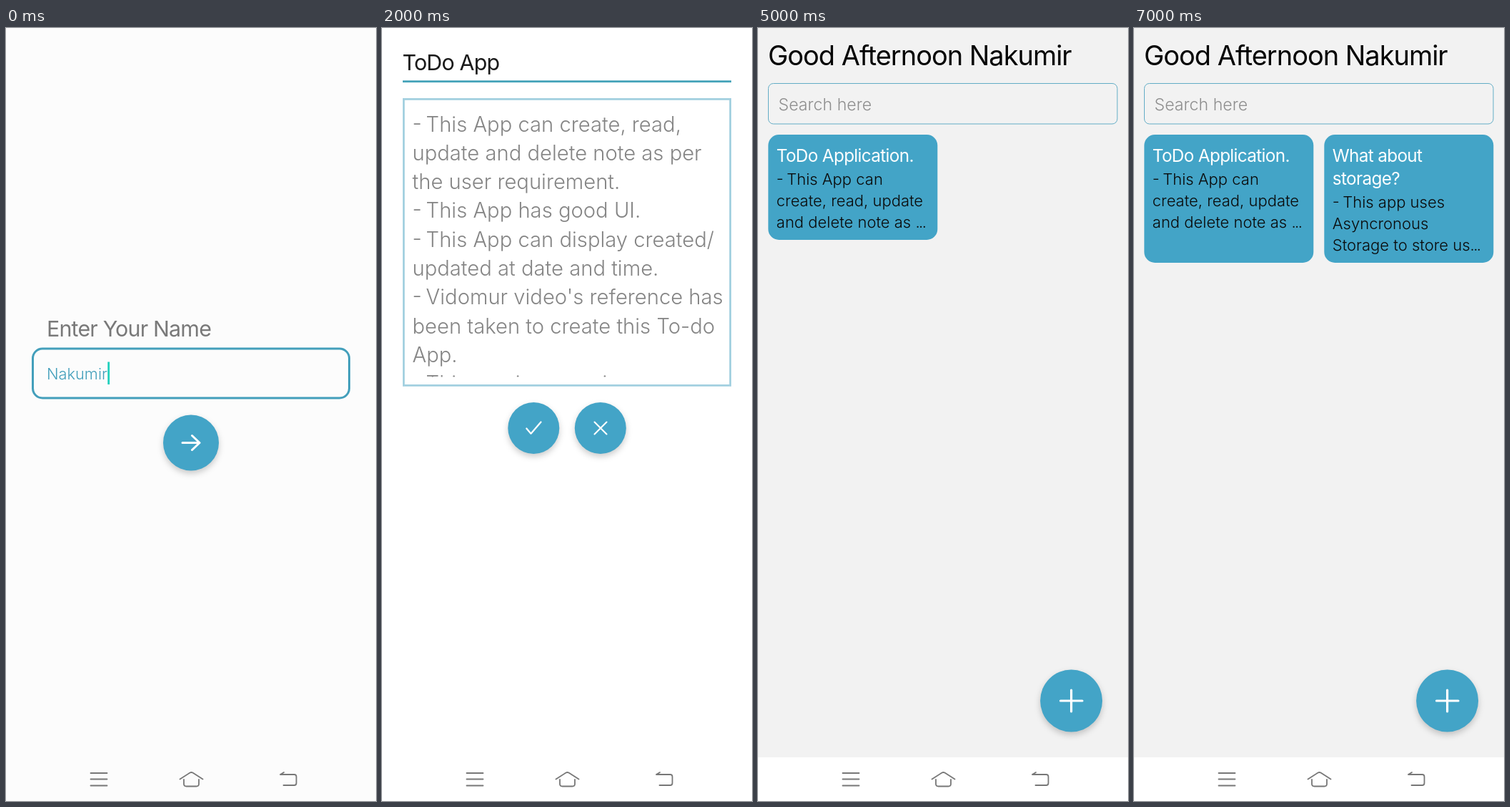
Recreate the animation shown at these times as an HTML page. Size 518 px wide and 1080 px high, loop 8000 ms.

```html
<!DOCTYPE html>
<html lang="en">
<head>
<meta charset="utf-8">
<title>To-do app walkthrough</title>
<style>
  html, body { margin: 0; width: 100%; height: 100%; overflow: hidden; background: #fff; }
  svg { display: block; width: 100vw; height: 100vh; }
  text { font-family: Inter, Roboto, "Noto Sans", sans-serif; font-optical-sizing: none; }
  .head { font-weight: 400; letter-spacing: -0.027em; }
  .body { font-weight: 300; }
  .dash { font-feature-settings: "case"; letter-spacing: -0.04em; }
  .dots { letter-spacing: -0.07em; }
  .fab { filter: drop-shadow(0 4px 4px rgba(0, 0, 0, .2)); }
  .line { fill: none; stroke-linecap: round; stroke-linejoin: round; }
</style>
</head>
<body>
<svg id="stage" viewBox="0 0 518 1080" preserveAspectRatio="none"></svg>
<script>
const BLUE = '#43a4c7';
const USER = 'Nakumir';
const LOOP = 8000;

const rect = (x, y, w, h, fill, more = '') =>
  `<rect x="${x}" y="${y}" width="${w}" height="${h}" fill="${fill}" ${more}/>`;
const text = (cls, x, y, size, fill, str) =>
  `<text class="${cls}" x="${x}" y="${y}" font-size="${size}" fill="${fill}">${str}</text>`;
// bullets sit high and close, trailing dots are tight
const mark = str => str
  .replace(/^- /, '<tspan class="dash">- </tspan>')
  .replace(/\.\.\.$/, '<tspan class="dots">...</tspan>');
const head = (...a) => text('head', ...a);
const body = (x, y, size, fill, str) => text('body', x, y, size, fill, mark(str));
const lines = (draw, x, y, step, size, fill, list) =>
  list.map((s, i) => draw(x, y + i * step, size, fill, s)).join('');
const path = (d, color, width) =>
  `<path class="line" d="${d}" stroke="${color}" stroke-width="${width}"/>`;
const button = (x, y, r, icon, width) =>
  `<circle class="fab" cx="${x}" cy="${y}" r="${r}" fill="${BLUE}"/>` + path(icon, '#fff', width);

const navBar = path(
  'M118.5 1041h23M118.5 1049.5h23M118.5 1058.5h23' +
  'M243.5 1049.5L257.5 1040.5Q259.5 1039.5 261.5 1040.5L275.5 1049.5' +
  'M249 1050v6q0 3.5 3.5 3.5h14q3.5 0 3.5-3.5v-6' +
  'M384 1043h19.5q3 0 3 3v9q0 3-3 3H388.5M384 1043l5-3', '#777', 1.8);

const aboutText = [
  '- This App can create, read,',
  'update and delete note as per',
  'the user requirement.',
  '- This App has good UI.',
  '- This App can display created/',
  'updated at date and time.',
  "- Vidomur video's reference has",
  'been taken to create this To-do',
  'App.'
];
const storageText = [
  '- This app uses Asyncronous',
  'Storage to store user name,',
  'notes, date and time of',
  'creation/updation of notes.'
];

function intro() {
  return rect(0, 0, 518, 1080, '#fcfcfc') +
    head(57, 430.5, 30.4, '#797979', 'Enter Your Name') +
    rect(37.5, 448, 443, 69, 'none', 'rx="13.5" stroke="#439fbb" stroke-width="3"') +
    body(57, 491, 21.8, '#439fbb', USER) +
    rect(142.3, 466.5, 2.8, 31.5, '#1fd0bd') +
    button(259, 579.5, 39, 'M247 579.5h24M260.5 569.5l10.5 10l-10.5 10', 3);
}

function editor(title, list, caret = '') {
  return head(28.5, 59, 30.4, '#1a1a1a', title) +
    rect(29, 73.3, 460, 2.8, '#43a2b8') +
    rect(30.4, 99.4, 457.2, 400, 'none', 'stroke="#a3d0e0" stroke-width="2.8"') +
    `<g clip-path="url(#page)">${lines(body, 42.5, 144.5, 40.3, 29.2, '#858585', list)}</g>` +
    caret +
    button(212.3, 559, 36, 'M202.3 559.5l6.2 7.2l14-16.2', 2.2) +
    button(305.8, 559, 36, 'M297.5 550.5l17 17M314.5 550.5l-17 17', 2.1);
}

function card(x, h, title, list) {
  const y = 186.7;
  return rect(x, 149, 237, h, BLUE, 'rx="15"') +
    lines(head, x + 11.5, y, 32.2, 24.3, '#fff', title) +
    lines(body, x + 11.5, y + 32.2 * title.length - 0.4, 30.2, 22, '#0a0a0a', list);
}

const greyPage = () => rect(0, 0, 518, 1019, '#f2f2f2');

function home(cards) {
  const search = rect(14.5, 77.5, 488.5, 56.5, 'none', 'rx="7" stroke="#62adc6" stroke-width="1"') +
    body(28.5, 115, 23.2, '#8e8e8e', 'Search here');
  return greyPage() +
    head(14, 52, 38, '#050505', 'Good Afternoon ' + USER) +
    (cards ? search + cards : '') +
    button(438.6, 940, 43.5, 'M423.5 940h30.5M438.6 925v30', 3.2);
}

function detail() {
  return greyPage() +
    head(14.5, 130, 43, BLUE, 'ToDo Application.') +
    lines(body, 14.5, 180, 40.3, 29.2, '#737373', aboutText);
}

const aboutCard = (title, h) =>
  card(14.3, h, [title], ['- This App can', 'create, read, update', 'and delete note as ...']);
const storageCard = card(266.3, 179, ['What about', 'storage?'],
  ['- This app uses', 'Asyncronous', 'Storage to store us...']);

// start time in ms, picture
const steps = [
  [0, intro()],
  [1000, home('')],
  [2000, editor('ToDo App', [...aboutText, '- This app is even nicer'])],
  [3000, home(aboutCard('ToDo App', 147))],
  [4000, detail()],
  [5000, home(aboutCard('ToDo Application.', 147))],
  [6000, editor('What about storage?', storageText, rect(398.8, 233.5, 2.8, 40.5, '#7de8d6'))],
  [7000, home(aboutCard('ToDo Application.', 179) + storageCard)]
];

const stage = document.getElementById('stage');
stage.innerHTML =
  '<defs><clipPath id="page"><rect x="32" y="101" width="454" height="386.5"/></clipPath></defs>' +
  rect(0, 0, 518, 1080, '#fff') +
  steps.map(s => `<g class="scene" visibility="hidden">${s[1]}</g>`).join('') + navBar;

const scenes = [...stage.querySelectorAll('.scene')];
let shown = -1;

function tick() {
  const t = performance.now() % LOOP;
  const now = steps.filter(s => s[0] <= t).length - 1;
  if (now !== shown) {
    scenes.forEach((g, i) => g.setAttribute('visibility', i === now ? 'visible' : 'hidden'));
    shown = now;
  }
  requestAnimationFrame(tick);
}
tick();
</script>
</body>
</html>
```
